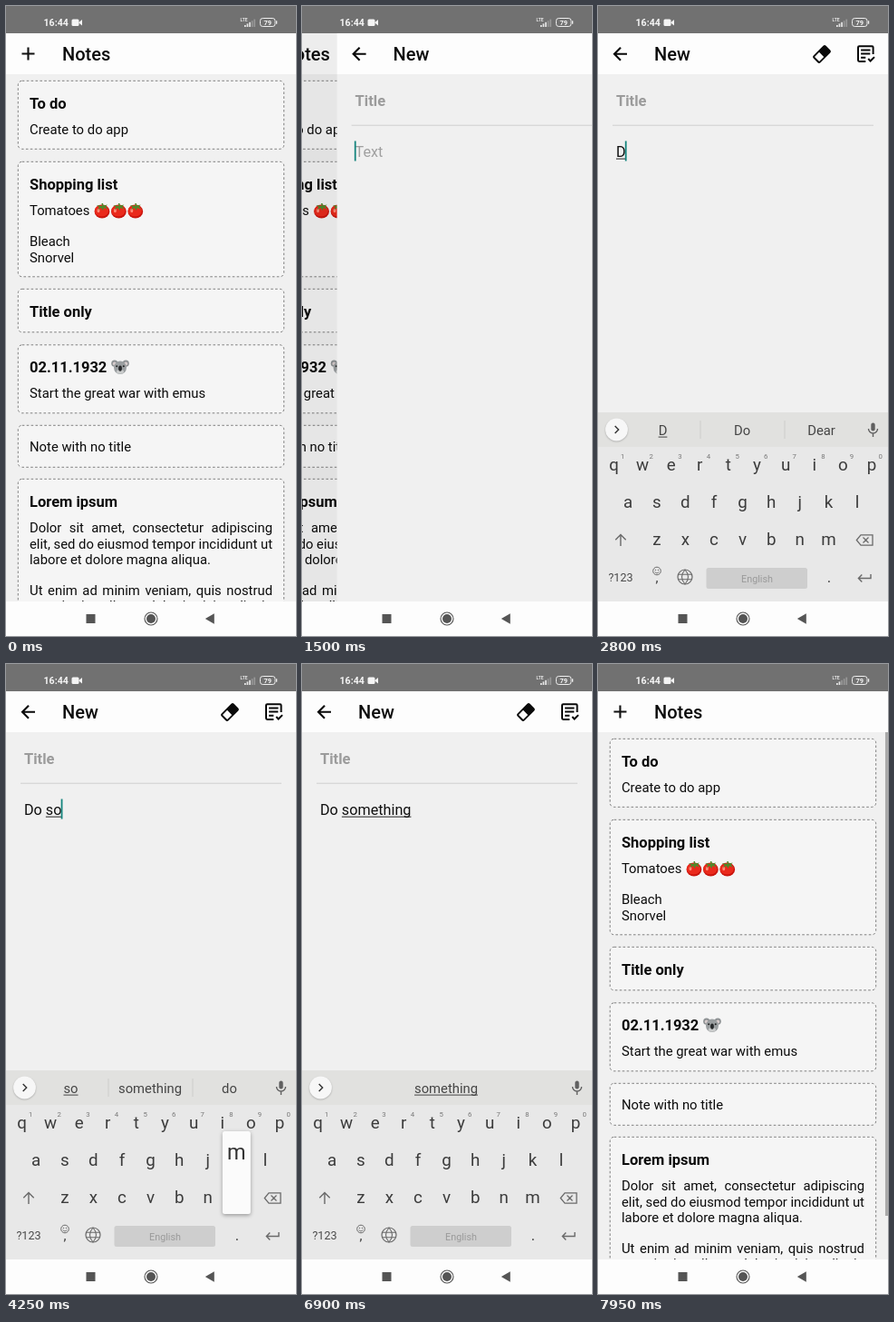
An HTML page with a canvas for the animation above (8 s loop, 320 by 693 pixels).

```html
<!DOCTYPE html>
<html lang="en">
<head>
<meta charset="utf-8">
<title>Notes</title>
<style>
html, body { margin: 0; width: 100%; height: 100%; overflow: hidden; background: #f0f0f0; }
canvas { display: block; width: 320px; height: 693px; }
</style>
</head>
<body>
<canvas id="stage"></canvas>
<script>
const W = 320, H = 693, LOOP = 8000;
const canvas = document.getElementById('stage');
const ctx = canvas.getContext('2d');
const dpr = window.devicePixelRatio || 1;
canvas.width = W * dpr;
canvas.height = H * dpr;

const OPEN_AT = 1301, CLOSE_AT = 7390;
const TITLE = 'bold 16.5px', BODY = '14.85px', INPUT = '16.2px';

// ---------- helpers ----------
function rect(x, y, w, h, color) {
  ctx.fillStyle = color;
  ctx.fillRect(x, y, w, h);
}
function round(x, y, w, h, r) {
  ctx.beginPath();
  ctx.roundRect(x, y, w, h, r);
}
function disc(x, y, r, color, ry = r) {
  ctx.fillStyle = color;
  ctx.beginPath();
  ctx.ellipse(x, y, r, ry, 0, 0, 7);
  ctx.fill();
}
function ring(x, y, r, color, width) {
  ctx.strokeStyle = color;
  ctx.lineWidth = width;
  ctx.beginPath();
  ctx.arc(x, y, r, 0, 7);
  ctx.stroke();
}
function stroke(path, color, width) {
  ctx.strokeStyle = color;
  ctx.lineWidth = width;
  ctx.stroke(new Path2D(path));
}
function fill(path, color) {
  ctx.fillStyle = color;
  ctx.fill(new Path2D(path));
}
function setFont(font) {
  ctx.font = font + ' Roboto, sans-serif';
}
function text(str, x, y, font, color = '#0c0c0c', align = 'left') {
  setFont(font);
  ctx.fillStyle = color;
  ctx.textAlign = align;
  ctx.fillText(str, x, y);
}
function justified(line, x, y, width) {
  setFont(BODY);
  const words = line.split(' ');
  const used = words.reduce((sum, w) => sum + ctx.measureText(w).width, 0);
  const gap = (width - used) / (words.length - 1);
  for (const w of words) {
    text(w, x, y, BODY);
    x += ctx.measureText(w).width + gap;
  }
}
function layer(x, y, draw) {
  ctx.save();
  ctx.translate(x, y);
  draw();
  ctx.restore();
}
// critically damped spring, 1 -> 0
function spring(ms) {
  const u = Math.max(0, ms) * 0.01826;
  return Math.exp(-u) * (1 + u);
}
const clamp = v => Math.min(1, Math.max(0, v));
const easeOut = p => 1 - (1 - p) ** 3;
const latest = (list, t) => list.filter(e => e[0] <= t).pop()[1];
const within = (t, spans) => spans.some(([a, b]) => t >= a && t < b);

// ---------- script of the typing ----------
const typed = [
  [0, ''], [2550, 'D'], [2900, 'Do'], [3150, 'Do '], [3400, 'Do s'], [4100, 'Do so'],
  [4350, 'Do som'], [4600, 'Do some'], [4900, 'Do somet'], [5300, 'Do someth'],
  [5500, 'Do somethi'], [5900, 'Do somethin'], [6350, 'Do something']
];
const hints = [
  [0, ['I', 'The', "I'm"]], [2600, ['D', 'Do', 'Dear']], [2950, ['Do', "Don't", 'Download']],
  [3150, ['something', 'you', 'not']], [3450, ['s', 'something', 'so']],
  [4100, ['so', 'something', 'do']], [4400, ['som', 'something', 'some']],
  [4650, ['some', 'something', 'sometimes']], [4950, ['somet', 'something', 'sometimes']],
  [5300, ['someth', 'something', 'somethings']], [5600, ['somethi', 'something', 'somethings']],
  [5950, ['somethin', 'something', 'somethings']], [6400, ['', 'something', '']]
];
const presses = [
  ['d', 2500, 2600], ['o', 2850, 2950], ['s', 3350, 3450], ['o', 3950, 4100], ['m', 4250, 4400],
  ['t', 4850, 4950], ['h', 5200, 5300], ['i', 5450, 5600], ['n', 5850, 5950], ['g', 6300, 6400]
];
const cursorOff = [[2350, 2500], [3950, 4100], [6900, 7400]];

// ---------- list screen ----------
function tomato(x, y) {
  layer(x, y, () => {
    disc(0, 1, 8.4, '#c9140d', 7.4);
    disc(-0.5, 0.2, 7.6, '#ea2a1c', 6.3);
    disc(-4, 0, 1.5, '#ff8a78', 2.3);
    fill('M0-5L-6-6L-3-3.5L-5-.5L-1-3L1 0L2-3L6-1.5L4-4.5L6-6.5L1.5-5.5L1-8L-.5-8Z', '#4f8a2b');
  });
}
function koala(x, y) {
  layer(x, y, () => {
    for (const s of [-1, 1]) {
      disc(s * 6.2, -3.8, 3.6, '#8d9193');
      disc(s * 6.2, -3.4, 2, '#d8cdcd');
    }
    disc(0, 0.8, 7, '#9a9ea0', 7.2);
    disc(0, 5.3, 4, '#c9cbcb', 2.4);
    disc(-3.8, -0.8, 1, '#222');
    disc(3.8, -0.8, 1, '#222');
    disc(0, 1.6, 1.9, '#26282a', 3.2);
  });
}
function card(y, h) {
  round(13.3, y + 0.3, 293.4, h, 4.5);
  ctx.fillStyle = '#f5f5f5';
  ctx.fill();
  ctx.strokeStyle = '#6c6c6c';
  ctx.lineWidth = 0.85;
  ctx.setLineDash([2.6, 2.3]);
  ctx.stroke();
  ctx.setLineDash([]);
}
function header(title) {
  rect(0, 30, W, 45, '#fdfdfd');
  text(title, 62, 60, '500 20px');
}
function listScreen(t) {
  rect(0, 30, W, 625, '#f0f0f0');
  header('Notes');
  ctx.globalAlpha = within(t, [[1050, 1350]]) ? 0.5 : 1;
  stroke('M17.5 52.5H31.5M24.5 45.5V59.5', '#111', 2.1);
  ctx.globalAlpha = 1;

  card(82, 75);
  text('To do', 26, 112.6, TITLE);
  text('Create to do app', 26, 140.5, BODY);

  card(171, 126.5);
  text('Shopping list', 26, 201.6, TITLE);
  text('Tomatoes', 26, 230.2, BODY);
  for (let i = 0; i < 3; i++) tomato(106 + 18.4 * i, 225);
  text('Bleach', 26, 264.3, BODY);
  text('Snorvel', 26, 281.6, BODY);

  card(311, 47.5);
  text('Title only', 26, 342, TITLE);

  card(372.5, 75);
  text('02.11.1932', 26, 403, TITLE);
  koala(126, 397);
  text('Start the great war with emus', 26, 431.2, BODY);

  card(461, 46);
  text('Note with no title', 26, 490.3, BODY);

  card(520, 200);
  text('Lorem ipsum', 26, 550.8, TITLE);
  justified('Dolor sit amet, consectetur adipiscing', 26, 579.4, 268);
  justified('elit, sed do eiusmod tempor incididunt ut', 26, 596.6, 268);
  text('labore et dolore magna aliqua.', 26, 613.8, BODY);
  justified('Ut enim ad minim veniam, quis nostrud', 26, 648.2, 268);
  justified('exercitation ullamco laboris nisi ut aliquip', 26, 665.4, 268);

  if (t >= 7400) rect(317, 75, 3, 532, '#a9a9a9');
}

// ---------- editor screen ----------
function eraserIcon(x, y) {
  layer(x, y, () => {
    ctx.rotate(-Math.PI / 4);
    ctx.beginPath();
    ctx.roundRect(-9.8, -5.5, 19.6, 11, 2.2);
    ctx.rect(-7.7, -3.6, 7.2, 7.2);
    ctx.fillStyle = '#0a0a0a';
    ctx.fill('evenodd');
  });
}
function saveIcon(x, y) {
  layer(x, y, () => {
    stroke('M0 8.3H-7A1.3 1.3 0 0 1-8.3 7V-7A1.3 1.3 0 0 1-7-8.3H7A1.3 1.3 0 0 1 8.3-7V.5' +
      'M-5.2-4.1H5.2M-5.2 0H5M-5.2 4.1H0M2.9 5.4L5.3 7.9L9.7 3.5', '#0a0a0a', 2);
  });
}
function editorScreen(t) {
  const str = latest(typed, t);
  rect(0, 30, W, 625, '#f0f0f0');
  header('New');
  ctx.globalAlpha = within(t, [[7250, 7400]]) ? 0.5 : 1;
  stroke('M32 52.7H18.5M25 45.7L18 52.7L25 59.7', '#0a0a0a', 2.1);
  ctx.globalAlpha = 1;
  if (str) {
    eraserIcon(247, 53);
    saveIcon(295.3, 52.6);
  }
  text('Title', 20, 109.8, TITLE, '#9b9b9b');
  rect(16, 130.7, 288, 1, '#cfcfcf');

  text(str || 'Text', 20, 166, INPUT, str ? '#111' : '#a0a0a0');
  const end = 20 + ctx.measureText(str).width;
  const word = str.split(' ').pop();
  const wordWidth = ctx.measureText(word).width;
  if (word) rect(end - wordWidth, 167.6, wordWidth, 1, '#222');
  if (!within(t, cursorOff)) rect(end - 0.8, 148.5, 1.8, 22, '#15857e');
}

// ---------- keyboard ----------
const rows = [['qwertyuiop', 17.5, 511], ['asdfghjkl', 33.2, 551.5], ['zxcvbnm', 64.8, 593]];
const KEY = 31.6, INK = '#3c3c3c', SOFT = '#6a6a6a';

function suggestion(word, x, underlined) {
  if (!word) return;
  setFont('14.8px');
  const size = 14.8 * Math.min(1, 71 / ctx.measureText(word).width);
  text(word, x, 472, size + 'px', '#454545', 'center');
  if (!underlined) return;
  const w = ctx.measureText(word).width;
  rect(x - w / 2, 473.6, w, 1, '#454545');
}
function suggestionBar(t) {
  const words = latest(hints, t);
  const single = !words[0];
  const composing = latest(typed, t).split(' ').pop() !== '';
  rect(0, 447, W, 38, '#e1e1df');
  ctx.save();
  ctx.shadowColor = 'rgba(0,0,0,.25)';
  ctx.shadowBlur = 2;
  ctx.shadowOffsetY = 0.8;
  disc(20.5, 466, 12.4, '#f7f7f7');
  ctx.restore();
  stroke('M18.7 462L22.7 466L18.7 470', '#333', 1.4);
  words.forEach((word, i) =>
    suggestion(word, 71.5 + 87.5 * i, composing && i === (single ? 1 : 0)));
  if (!single) for (const x of [112.5, 205.5]) rect(x, 456, 1, 20, '#cdcdcb');
  round(301.3, 458.5, 4.4, 9, 2.2);
  ctx.fillStyle = '#606060';
  ctx.fill();
  stroke('M298.5 465A5 5 0 0 0 308.5 465M303.5 470V474', '#606060', 1.4);
}
function keyPopup(char, x, y) {
  ctx.save();
  ctx.shadowColor = 'rgba(0,0,0,.35)';
  ctx.shadowBlur = 4;
  ctx.shadowOffsetY = 1.5;
  round(x - 15.5, y - 79, 31, 91, 2.5);
  ctx.fillStyle = '#fbfbfb';
  ctx.fill();
  ctx.restore();
  text(char, x, y - 48, '23.5px', '#333', 'center');
}
function bottomRow(t) {
  text('?123', 25, 632.6, '12.6px', '#4a4a4a', 'center');
  ring(65, 621.5, 4.3, SOFT, 1);
  disc(63.5, 620.4, 0.7, SOFT);
  disc(66.5, 620.4, 0.7, SOFT);
  stroke('M62.7 622.6Q65 625.6 67.3 622.6', SOFT, 0.9);
  text(',', 65, 634, '15px', INK, 'center');
  ring(96, 628, 8, SOFT, 1.2);
  stroke('M88.6 625.2H103.4M88.6 630.8H103.4M96 620Q89 628 96 636Q103 628 96 620', SOFT, 1.1);
  round(119.5, 618, 111.5, 23, 2.5);
  ctx.fillStyle = within(t, [[3000, 3150]]) ? '#b9b9b9' : '#cecece';
  ctx.fill();
  text('English', 175.5, 633.5, '10.8px', '#9a9a9a', 'center');
  text('.', 255, 633.5, '17px', INK, 'center');
  stroke('M301 625V629.5H287.5M291.3 625.6L287.4 629.5L291.3 633.4', SOFT, 1.4);
}
function keyboard(t) {
  const upper = t < 2600;
  const shape = c => upper ? c.toUpperCase() : c;
  rect(0, 447, W, 208, '#e8e8e8');
  suggestionBar(t);
  for (const [chars, x0, y] of rows) {
    [...chars].forEach((c, i) => text(shape(c), x0 + KEY * i, y, '18.8px', INK, 'center'));
  }
  for (let i = 0; i < 10; i++) {
    text((i + 1) % 10, 27.2 + KEY * i, 498, '7.8px', '#777', 'center');
  }
  const arrow = 'M25 594V582M19.3 587.2L25 581.5L30.7 587.2';
  stroke(arrow, upper && t < 2350 ? '#2f2f2f' : SOFT, 1.4);
  stroke('M290 581.8H303V593.2H290L285.3 587.5ZM292.5 584.5L298.5 590.5M298.5 584.5L292.5 590.5', SOFT, 1.3);
  bottomRow(t);

  const press = presses.find(([, from, to]) => t >= from && t < to);
  if (!press) return;
  const [chars, x0, y] = rows.find(r => r[0].includes(press[0]));
  keyPopup(shape(press[0]), x0 + KEY * chars.indexOf(press[0]), y);
}

// ---------- system bars ----------
function statusBar(t) {
  rect(0, 0, W, 30, '#717171');
  text('16:44', 41.5, 22, 'bold 10.6px', '#f4f4f4');
  round(72.5, 14.5, 8, 7.5, 1.5);
  ctx.fillStyle = '#f4f4f4';
  ctx.fill();
  fill('M80 18.2L84 15V21.5Z', '#f4f4f4');
  text('LTE', 258.5, 16.6, 'bold 5px', '#e6e6e6');
  for (let i = 0; i < 5; i++) {
    const h = 2 + i * 1.6;
    const lit = i < (t < 7100 ? 3 : 2);
    rect(263 + i * 2.6, 23 - h, 1.7, h, lit ? '#e6e6e6' : '#979797');
  }
  round(280.5, 13.5, 16.5, 9, 2.8);
  ctx.strokeStyle = '#eeeeee';
  ctx.lineWidth = 1;
  ctx.stroke();
  rect(298, 16.3, 1.2, 3.4, '#eeeeee');
  text('79', 288.8, 20.9, 'bold 7.4px', '#f4f4f4', 'center');
}
function navBar() {
  rect(0, 655, W, 38, '#fdfdfd');
  rect(88.5, 669, 10, 10, '#555');
  ring(160, 674, 7, '#555', 1.1);
  disc(160, 674, 5, '#555');
  fill('M219.8 674L229.8 668.3V679.7Z', '#555');
}

// ---------- scene ----------
function render(t) {
  ctx.setTransform(dpr, 0, 0, dpr, 0, 0);
  const hidden = t < CLOSE_AT ? spring(t - OPEN_AT) : 1 - spring(t - CLOSE_AT);
  const shown = 1 - hidden;

  layer(-0.3 * W * shown, 0, () => listScreen(t));
  if (shown > 0) {
    rect(0, 30, W, 625, `rgba(0,0,0,${0.07 * shown})`);
    if (hidden < 0.999) layer(W * hidden, 0, () => editorScreen(t));
  }
  const raised = easeOut(clamp((t - 1550) / 250)) - easeOut(clamp((t - 7390) / 230));
  if (raised > 0) layer(0, 208 * (1 - raised), () => keyboard(t));
  statusBar(t);
  navBar();
}
function tick() {
  render(performance.now() % LOOP);
  requestAnimationFrame(tick);
}
tick();
</script>
</body>
</html>
```
